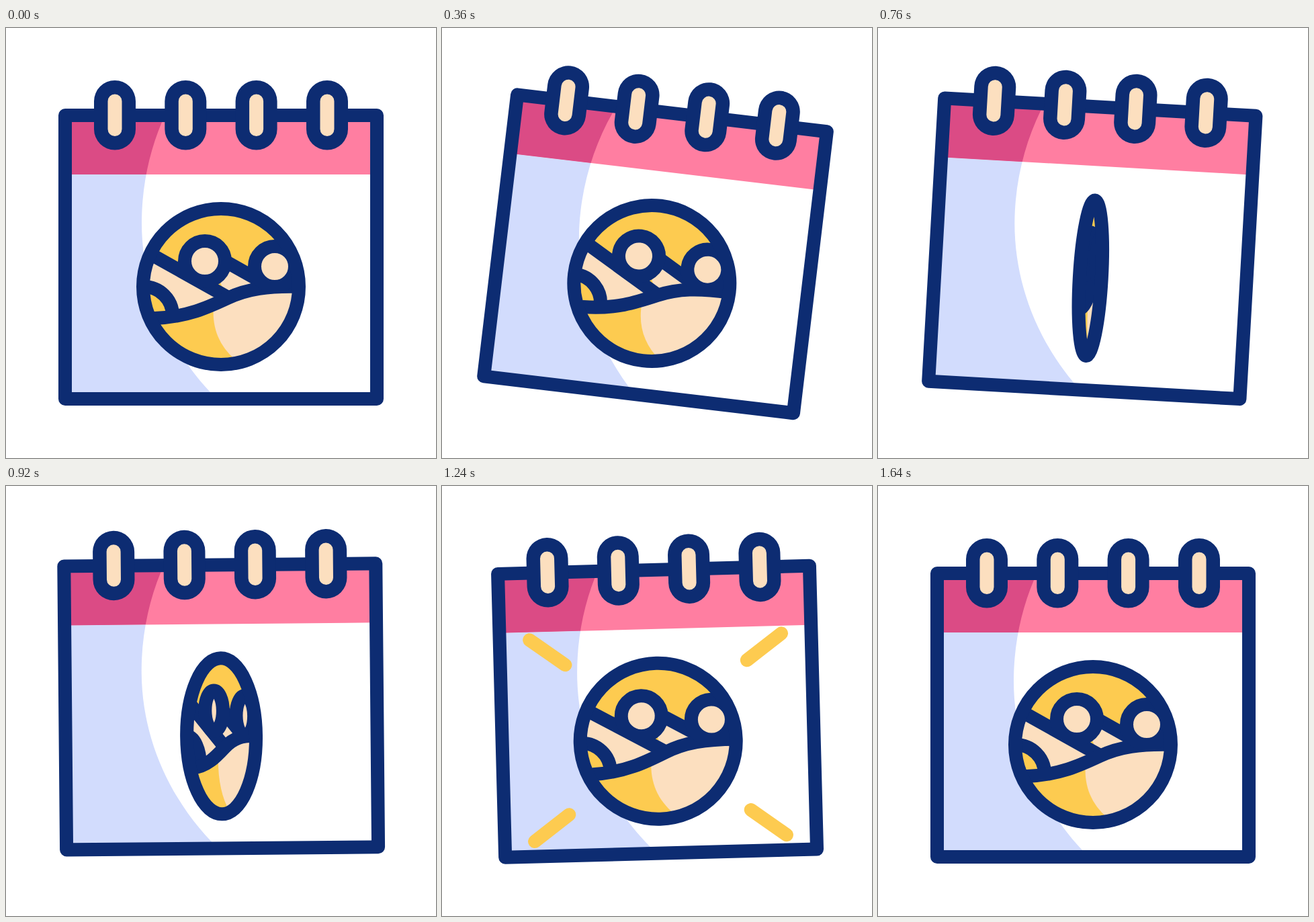
Write an HTML page that moves like this. It is 640 px wide and 640 px high and loops after 2 s.

```html
<!DOCTYPE html>
<html lang="en">
<head>
<meta charset="utf-8">
<title>Calendar</title>
<style>
  html, body { margin: 0; height: 100%; overflow: hidden; background: #fff; }
  svg { display: block; width: 100vw; height: 100vh; }
  .ink { stroke: #0d2c72; stroke-width: 20; fill: none; stroke-linejoin: round; }
  .peach { fill: #fcdfbf; }
  .yellow { fill: #fdcb50; }
  #badge * { vector-effect: non-scaling-stroke; }
  #rings { fill: none; stroke-linecap: round; }
  #ray { fill: none; stroke: #fdcb50; stroke-width: 20; stroke-linecap: round; }
</style>
</head>
<body>
<svg viewBox="0 0 640 640">
  <defs>
    <clipPath id="disc"><circle r="116" cx="320" cy="385"/></clipPath>
    <path id="ray"/>
    <path id="bars" d="M162 109V150.5M267.3 109V150.5M372.6 109V150.5M478 109V150.5"/>
  </defs>
  <g id="calendar">
    <path fill="#fff" d="M88 130H552V552H88z"/>
    <path fill="#ff7ea1" d="M88 130H552V218H88z"/>
    <clipPath id="shade">
      <path d="M88 130H236L232 140C213 185 202 237 202 290C202 386 241 475 304 542L314 552H88z"/>
    </clipPath>
    <g clip-path="url(#shade)">
      <path fill="#d2dcfd" d="M88 218H330V552H88z"/>
      <path fill="#db4b85" d="M88 130H330V218H88z"/>
    </g>
    <path class="ink" d="M88 130H552V552H88z"/>
    <g id="rings">
      <use href="#bars" stroke="#0d2c72" stroke-width="62"/>
      <use href="#bars" stroke="#fcdfbf" stroke-width="21"/>
    </g>
    <g id="badge">
      <g clip-path="url(#disc)">
        <circle class="yellow" r="116" cx="320" cy="385"/>
        <path class="peach" d="M200 328L340 406L250 440H200zM300 333L390 383L330 405z"/>
        <circle class="ink yellow" r="43" cx="205" cy="428" style="fill:#fdcb50"/>
        <path class="ink" d="M200 328L334 403M310 338L390 383"/>
        <path class="yellow" d="M200 432H222C270 430 300 416 330 402S390 384 436 385V520H200z"/>
        <path class="peach" d="M309 412C306 448 318 475 345 497H440V385C390 384 360 390 330 402z"/>
        <path class="ink" d="M200 432H222C270 430 300 416 330 402S390 384 436 385"/>
        <circle class="ink" r="30" cx="296" cy="347" style="fill:#fcdfbf"/>
        <circle class="ink" r="30" cx="400" cy="355" style="fill:#fcdfbf"/>
      </g>
      <circle class="ink" r="116" cx="320" cy="385"/>
    </g>
    <g id="rays" transform="translate(320 379.5)">
      <use href="#ray"/>
      <use href="#ray" transform="scale(-1 1)"/>
      <use href="#ray" transform="scale(1 -1)"/>
      <use href="#ray" transform="scale(-1 -1)"/>
    </g>
  </g>
</svg>
<script>
const LOOP = 2000;
const $ = id => document.getElementById(id);

// Keys are [time in ms, value], eased between neighbours.
const tilt = [[0, 0], [440, 7.15], [1140, -2.15], [1470, 1.7], [1640, 0]];
const lift = [[70, 0], [750, -12.7], [880, -12.7], [1545, 0]];
const squeeze = [[430, 1], [760, 0.142], [1140, 1]];
const rayHead = [[1040, 0], [1240, 1]];
const rayTail = [[1140, 0], [1440, 1]];

// cubic-bezier(.5, 0, .5, 1)
function ease(x) {
  let u = x;
  for (let i = 0; i < 6; i++) {
    u -= (1.5 * u * (1 - u) + u ** 3 - x) / (1.5 - 3 * u + 3 * u * u);
  }
  return u * u * (3 - 2 * u);
}

function valueAt(keys, t) {
  const next = keys.findIndex(([time]) => t < time);
  if (next === 0) return keys[0][1];
  if (next < 0) return keys[keys.length - 1][1];
  const [t0, a] = keys[next - 1], [t1, b] = keys[next];
  return a + (b - a) * ease((t - t0) / (t1 - t0));
}

function draw(t) {
  $('calendar').setAttribute('transform',
    `translate(0 ${valueAt(lift, t)}) rotate(${valueAt(tilt, t)} 320 320)`);
  $('badge').setAttribute('transform',
    `translate(320 0) scale(${valueAt(squeeze, t)} 1) translate(-320 0)`);

  const head = valueAt(rayHead, t), tail = valueAt(rayTail, t);
  const point = k => `${-121.5 - 66 * k} ${-101.3 - 48.7 * k}`;
  $('rays').style.display = head - tail > 0.001 ? '' : 'none';
  $('ray').setAttribute('d', `M${point(tail)}L${point(head)}`);
}

function tick() {
  draw(performance.now() % LOOP);
  requestAnimationFrame(tick);
}
tick();
</script>
</body>
</html>
```
